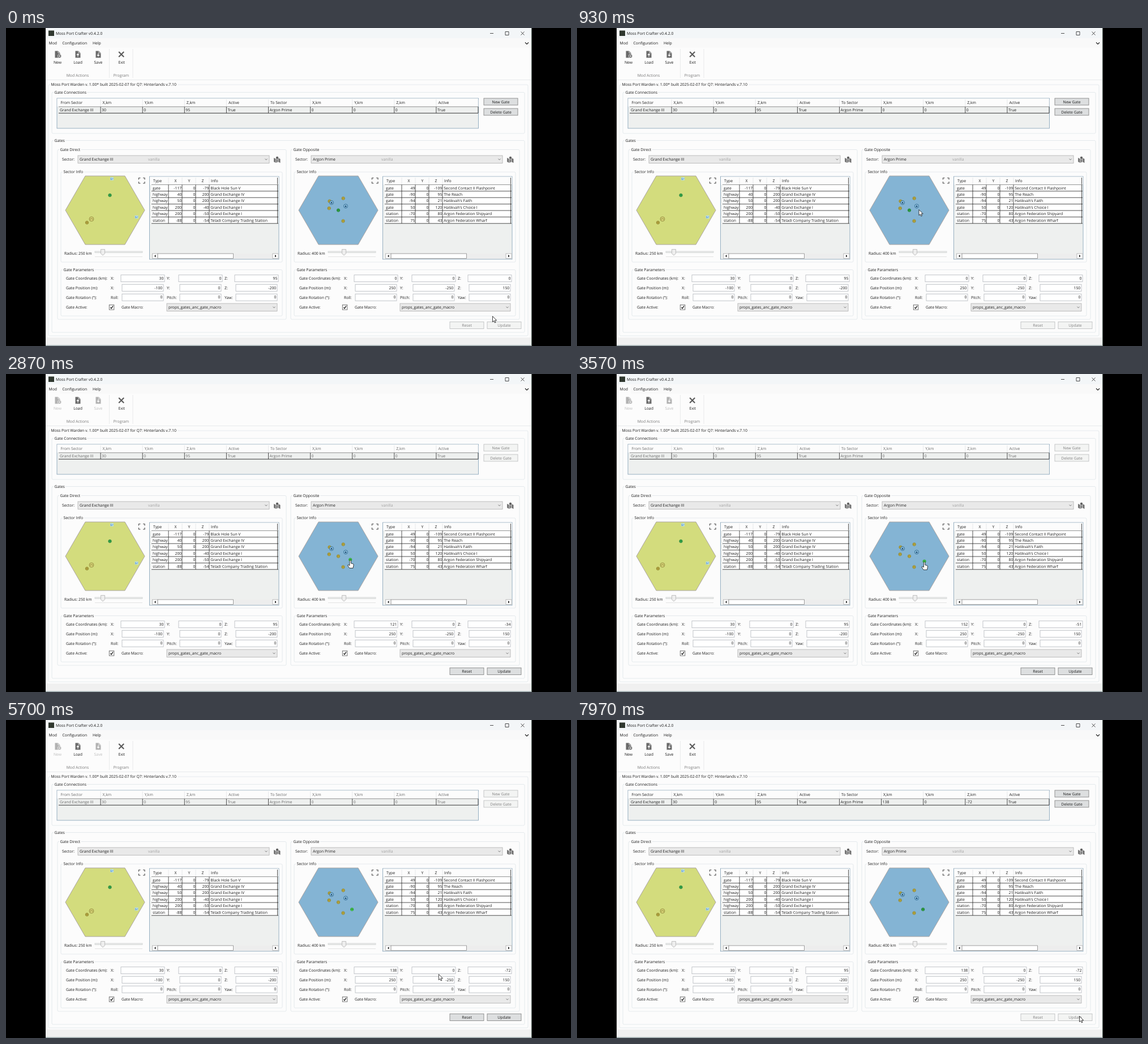
An HTML page that plays this animation: 998 by 561 pixels, repeating every 8000 ms.

```html
<!DOCTYPE html>
<html lang="en">
<head>
<meta charset="utf-8">
<title>Gate editor</title>
<style>
  html, body { margin: 0; width: 100%; height: 100%; overflow: hidden; background: #000; }
  svg { display: block; width: 998px; height: 561px; }
  text { font: 6.85px "Open Sans", "Noto Sans", sans-serif; fill: #1c1c1c; text-rendering: geometricPrecision; white-space: pre; }
  .legend { paint-order: stroke; stroke: #fcfcfc; stroke-width: 4px; }
  .soft { fill: #777; }
  .faint { fill: #a2a2a2; }
  .button rect { fill: #dddfe0; stroke: #7c7c7c; }
  .button.off rect { fill: #f3f4f3; stroke: #b8bbbc; }
  .button.hover rect { fill: #bee6f5; stroke: #3c7fb1; }
  .off text { fill: #808080; }
  #list.off text { fill: #686868; }
  .tool.off { opacity: .5; }
</style>
</head>
<body>
<svg id="stage" viewBox="0 0 998 561" xmlns="http://www.w3.org/2000/svg"></svg>
<script>
const PANEL_SHIFT = 412, LOOP = 8000;
const BG = '#fcfcfc', INK = '#222', MID = '#777';

// ---- markup helpers; text is placed by its vertical centre ----
const text = (x, y, s, anchor = 'start', attrs = '') =>
  `<text x="${x}" y="${y + 2.45}" text-anchor="${anchor}" ${attrs}>${s}</text>`;
const box = (x1, y1, x2, y2, fill, stroke = 'none', attrs = '') =>
  `<rect x="${x1}" y="${y1}" width="${x2 - x1}" height="${y2 - y1}" fill="${fill}" stroke="${stroke}" stroke-width=".8" ${attrs}/>`;
const path = (d, stroke = INK, width = .8, fill = 'none', attrs = '') =>
  `<path d="${d}" stroke="${stroke}" stroke-width="${width}" fill="${fill}" ${attrs}/>`;
const group = (content, attrs) => `<g ${attrs}>${content}</g>`;
const at = (x, y, content, attrs = '') => group(content, `transform="translate(${x} ${y})" ${attrs}`);

const frame = (x1, y1, x2, y2, label) =>
  box(x1, y1, x2, y2, 'none', '#dfe5e9', 'rx="2"') + text(x1 + 4.5, y1, label, 'start', 'class="legend"');
const button = (id, x, y, h, label) =>
  group(box(x, y, x + 60, y + h, '#ddd') + text(x + 30, y + h / 2 + .2, label, 'middle'), `id="${id}" class="button"`);
const combo = (x1, y1, x2, label) =>
  box(x1, y1, x2, y1 + 13.5, '#e9e9e9', '#b0b0b0') + text(x1 + 3, y1 + 6.8, label) +
  path(`M${x2 - 7.5} ${y1 + 5.7}l2 2 2-2`, '#555');
const field = (x1, y, x2, value, id = '') =>
  box(x1, y - 6, x2, y + 6, '#fff', '#b3b7bd') + text(x2 - 1.7, y - .2, value, 'end', id && `id="${id}"`);

// ---- window chrome and ribbon ----
const pageIcon = mark =>
  path('M-4-6H1.500L5-2.500V6H-4Z', 'none', 0, '#6a6a6a') + path('M1.500-6V-2.500H5', BG, .7) + path(mark, '#fff', 1.2);
const tool = (id, x, icon, label) =>
  group(at(x, 46.5, icon) + text(x + .5, 61, label, 'middle'), `id="${id}" class="tool"`);

function chrome() {
  return box(70, 0, 928, 561, BG) + box(70, 0, 928, 18, '#f3f6f8') + box(70, 18, 928, 34.5, '#f9f9f9') +
    box(74, 19, 95, 35, BG) + box(75, 4.5, 85, 14, '#30382f') +
    text(88, 9.3, 'Moss Port Crafter v0.4.2.0') +
    path('M855 9.500H861M882 6.500H888V12.500H882ZM909.500 6.500L915.500 12.500M915.500 6.500L909.500 12.500') +
    text(75.5, 27, 'Mod') + text(99.5, 27, 'Configuration') + text(153, 27, 'Help') +
    path('M917 25.500L920 28.500 923 25.500', INK, 1.2) +
    tool('new', 90.5, pageIcon('') + `<circle cx="4" cy="3" r="3.200" fill="#6a6a6a" stroke="${BG}" stroke-width=".7"/>` +
      path('M4 1.500V4.500M2.500 3H5.500', '#fff', .7), 'New') +
    tool('load', 126.5, pageIcon('M.500 4V-1M-1.500 1L.500-1 2.500 1'), 'Load') +
    tool('save', 162.5, pageIcon('M.500-2V3M-1.500 1L.500 3 2.500 1'), 'Save') +
    tool('exit', 203.7, path('M-4.500-4.500L4.500 4.500M4.500-4.500L-4.500 4.500', '#5c5c5c', 2.2), 'Exit') +
    text(126.5, 84, 'Mod Actions', 'middle', 'class="soft"') + text(203.5, 84, 'Program', 'middle', 'class="soft"') +
    path('M182.500 37V88M224 37V88M70 91.500H928', '#e4e6e8') +
    box(70, 546, 928, 559, '#f0f0f0') + box(70, 559.5, 928, 561, '#98a6a8') + box(927.5, 0, 928.5, 561, '#c3d3cb');
}

// ---- connection list ----
function connections() {
  const heads = ['From Sector', 'X,km', 'Y,km', 'Z,km', 'Active', 'To Sector', 'X,km', 'Y,km', 'Z,km', 'Active'];
  const values = ['Grand Exchange III', 30, 0, 95, 'True', 'Argon Prime', 0, 0, 0, 'True'];
  const columnX = i => 93 + i * 74.1;
  let list = box(90, 124, 834.5, 177, '#eef0ef', '#7f9db4') + box(90.5, 124.5, 834, 138.5, BG) +
    path('M93 138.900H834', MID) + path('M93 150.200H834', INK, .9);
  heads.forEach((head, i) => {
    const x = columnX(i);
    list += text(x + 3.5, 131.8, head) + text(x + 2, 144.6, values[i], 'start', `id="cell${i}"`) +
      path(`M${x + 74.1} 139V150`, INK) + path(`M${x + 74.1} 126V138`, '#e2e4e6');
  });
  return frame(75, 100, 922, 543, 'Moss Port Warden v. 1.00* built 2025-02-07 for Q7: Hinterlands v.7.10') +
    frame(81, 113.5, 916, 186, 'Gate Connections') + group(list, 'id="list"') +
    button('newGate', 844, 124, 12, 'New Gate') + button('deleteGate', 844, 142, 12, 'Delete Gate');
}

// ---- map symbols ----
const ring = (x, y, fill, edge, r = 2.7) => at(x, y,
  `<circle r="${r}" fill="${fill}" stroke="${edge}" stroke-width=".8"/>` +
  path(`M${-r * .45} ${r * .4}V${-r * .2}H${r * .45}V${r * .4}`, edge, .8));
const olive = (x, y) => ring(x, y, '#c3b548', '#877c2c');
const green = (x, y) => ring(x, y, '#3cb44c', '#22793a');
const highway = (x, y) => at(x, y, box(-3, -2.7, 3, 2.7, '#b5dcec') + path('M-1.500 2V-1.500M-.200 1.500L2.300-1', '#5790bd', 1));
const bluePort = (x, y) => at(x, y,
  '<circle r="3.500" fill="#8fc0de" stroke="#2f688f" stroke-width=".9"/>' + path('M-1.800 1.500L0-1.900 1.800 1.500Z', 'none', 0, '#17456b'));

const panels = [{
  title: 'Gate Direct', sector: 'Grand Exchange III', radius: 250, thumb: 171, color: '#d3dc7d',
  rows: [['gate', -117, -79, 'Black Hole Sun V'], ['highway', 40, 200, 'Grand Exchange IV'],
    ['highway', 50, 200, 'Grand Exchange IV'], ['highway', 200, -40, 'Grand Exchange I'],
    ['highway', 200, -50, 'Grand Exchange I'], ['station', -88, -54, 'Teladi Company Trading Station']],
  symbols: highway(187, 266) + highway(230.5, 333.5) + green(183.5, 295) + olive(143, 343.3) +
    ring(151, 337, '#dcd97c', '#857c30', 3.9),
  coords: [30, 0, 95], position: [-100, 0, -200]
}, {
  title: 'Gate Opposite', sector: 'Argon Prime', radius: 400, thumb: 185, color: '#84b4d4',
  rows: [['gate', 49, -109, 'Second Contact II Flashpoint'], ['gate', -90, 95, 'The Reach'],
    ['gate', -94, 21, "Hatikvah's Faith"], ['gate', 50, 120, "Hatikvah's Choice I"],
    ['station', -70, 80, 'Argon Federation Shipyard'], ['station', 75, 43, 'Argon Federation Wharf']],
  symbols: olive(159.5, 305.5) + bluePort(163, 308) + olive(183.7, 300.5) + bluePort(188, 314.2) +
    olive(158.7, 318) + olive(183.5, 340.5) + group(olive(175, 321.5), 'id="savedGate"') +
    '<g id="gate"><circle r="2.700" stroke-width=".8"/><path d="M-1.300 1.200V-.600H1.300V1.200" fill="none" stroke="#12662a" stroke-width=".8"/></g>',
  coords: [0, 0, 0], position: [250, -250, 150]
}];

function sectorTable(rows) {
  const top = 276.4, step = 11.4, bottom = top + step * rows.length;
  let out = box(253.5, 262, 482, 408, '#eef0ef', '#7f9db4') + box(254, 262.5, 481.5, top, BG) +
    box(257, top, 479.5, bottom, '#fff') + path(`M257 ${top}H481`, MID) +
    text(260, 269.5, 'Type') + text(362, 269.5, 'Info');
  ['X', 'Y', 'Z'].forEach((axis, i) => out += text(299.5 + i * 24, 269.5, axis, 'middle'));
  rows.forEach(([type, x, z, info], i) => {
    const y = top + step * (i + .5);
    out += text(259, y, type) + text(310.3, y, x, 'end') + text(334.3, y, 0, 'end') + text(358.3, y, z, 'end') +
      text(361.3, y, info) + path(`M257 ${top + step * (i + 1)}H481`);
  });
  for (const x of [287, 311, 335, 359, 479.5])
    out += path(`M${x} ${top}V${bottom}`) + path(`M${x} 264V275.500`, x > 400 ? INK : '#e2e4e6');
  return out + box(258, 397.8, 481.5, 407, '#ededed') + box(258.5, 398, 268, 406.5, '#fff', '#aaa') +
    box(268, 398, 401.5, 406.5, '#fff', '#888') + box(471, 398, 481, 406.5, '#fff', '#aaa') +
    path('M264.500 400L262 402.300 264.500 404.600Z', 'none', 0, '#111') + path('M475 400L477.500 402.300 475 404.600Z', 'none', 0, '#111');
}

function parameters(p, side) {
  const line = (y, label, names, values, inset, id) => text(106, y, label) + names.map((name, i) =>
    text([185, 284, 386][i], y, name) +
    field([203, 305, 404][i] + inset, y, [280, 382, 481][i] - inset, values[i], id && id + i)).join('');
  const axes = ['X:', 'Y:', 'Z:'];
  return frame(97, 426.5, 488, 508, 'Gate Parameters') +
    line(441.7, 'Gate Coordinates (km):', axes, p.coords, 0, `coord${side}_`) +
    line(458.3, 'Gate Position (m):', axes, p.position, 2) +
    line(475.2, 'Gate Rotation (°):', ['Roll:', 'Pitch:', 'Yaw:'], [0, 0, 0], 2) +
    text(106, 492.8, 'Gate Active:') + box(182.3, 488.5, 190.8, 497, '#fff', '#555') +
    path('M184.300 492.800L186 494.700 189 490.300', '#111', 1.2) +
    text(204, 492.8, 'Gate Macro:') + combo(284, 486, 479, 'props_gates_anc_gate_macro');
}

function panel(p, side) {
  const mapIcon = path('M473 229L477 231 480.500 229 484.500 231V238L480.500 236 477 238 473 236Z', 'none', 0, MID) +
    path('M477 231V238M480.500 229V236', BG, .7) +
    `<circle cx="479" cy="229" r="2.400" fill="#555" stroke="${BG}" stroke-width=".6"/>`;
  const expandIcon = path('M237.500 264.500H234.500V267.500M242 264.500H245V267.500M234.500 271V274H237.500M242 274H245V271', '#555', 1.2);
  return at(side * PANEL_SHIFT, 0,
    frame(91, 214.5, 495, 514, p.title) +
    text(99, 232, 'Sector:') + combo(127, 225, 465, p.sector) + text(251, 232, 'vanilla', 'start', 'class="faint"') + mapIcon +
    frame(97, 254, 488, 413, 'Sector Info') + expandIcon +
    path('M105 321.500L140 261H210L245 321.500 210 382H140Z', '#aaa3a1', 1, p.color) +
    sectorTable(p.rows) + text(103, 398, `Radius: ${p.radius} km`) +
    box(157, 394, 241, 396.3, '#e9ebea', '#d0d3d3') + path('M157 403.500H241', '#dedede') +
    path(`M${p.thumb - 3.5} 390.500H${p.thumb + 3.5}V398L${p.thumb} 401 ${p.thumb - 3.5} 398Z`, '#b4b4b4', .8, '#eee') +
    parameters(p, side) + p.symbols);
}

const cursors =
  path('M0 0V10L2.300 8 3.900 11.500 5.500 10.800 4 7.300H7.200Z', '#111', .8, '#fff', 'id="arrow"') +
  path('M-1.200 1Q0-.600 1.200 1V5.500L4.500 6.300Q6.200 6.700 5.900 8.500L4.800 14H-1.500L-4.600 9.500Q-4.500 7.600-2.800 8.500L-1.200 9.500Z', '#111', .8, '#fff', 'id="hand"');

document.getElementById('stage').innerHTML = chrome() + connections() +
  frame(81, 198.5, 916, 537, 'Gates') + panels.map(panel).join('') +
  button('reset', 784, 518.3, 12.3, 'Reset') + button('update', 850, 518.3, 12.3, 'Update') + cursors;

// ---- motion ----
const DRAG_START = 1350, DRAG_END = 4050, CLICK = 7250;
const KM = .175, ORIGIN = [587, 321.5];
const gateKeys = [[DRAG_START, 0, 0], [2070, 83, -13], [3570, 152, -51], [3950, 138, -72]];
const approachKeys = [[100, 859.5, 508.5], [850, 604, 320.5], [950, 604, 320.5], [1250, ...ORIGIN]];
const leaveKeys = [[DRAG_END, 611, 334], [4600, 611, 356.5], [4950, 611, 356.5], [6350, 887.5, 522.5]];

function sample(keys, t) {
  const next = keys.findIndex(key => key[0] > t);
  if (next < 1) return keys.at(next).slice(1);
  const [a, b] = [keys[next - 1], keys[next]];
  const u = (t - a[0]) / (b[0] - a[0]), eased = u * u * (3 - 2 * u);
  return [1, 2].map(i => a[i] + (b[i] - a[i]) * eased);
}

const el = id => document.getElementById(id);
const setText = (id, value) => { el(id).textContent = value; };
const show = (id, visible) => el(id).setAttribute('visibility', visible ? 'visible' : 'hidden');
const move = (id, [x, y]) => el(id).setAttribute('transform', `translate(${x} ${y})`);

function draw(t) {
  const dirty = t >= DRAG_START && t < CLICK, saved = t >= CLICK;
  const [x, z] = sample(gateKeys, t).map(Math.round);
  const gate = [ORIGIN[0] + x * KM, ORIGIN[1] - z * KM];
  const pointer = t < DRAG_START ? sample(approachKeys, t)
    : t < DRAG_END ? [gate[0], gate[1] + 1] : sample(leaveKeys, t);
  const dragging = t > 1180 && t < DRAG_END + 100;

  move('gate', [gate[0] - PANEL_SHIFT, gate[1]]);
  el('gate').firstChild.setAttribute('fill', dirty ? '#55dc55' : '#3cb44c');
  el('gate').firstChild.setAttribute('stroke', dirty ? '#2d9b3b' : '#22793a');
  show('savedGate', dirty);
  setText('coord1_0', x);
  setText('coord1_2', z);
  setText('cell6', saved ? x : 0);
  setText('cell8', saved ? z : 0);

  for (const id of ['new', 'save', 'list', 'newGate', 'deleteGate']) el(id).classList.toggle('off', dirty);
  for (const id of ['reset', 'update']) el(id).classList.toggle('off', !dirty);
  const overUpdate = pointer[0] > 850 && pointer[0] < 910 && pointer[1] > 518 && pointer[1] < 530.5;
  el('update').classList.toggle('hover', dirty && overUpdate);

  show('hand', dragging);
  show('arrow', !dragging);
  move(dragging ? 'hand' : 'arrow', pointer);
}

function tick() {
  draw(performance.now() % LOOP);
  requestAnimationFrame(tick);
}
tick();
</script>
</body>
</html>
```
